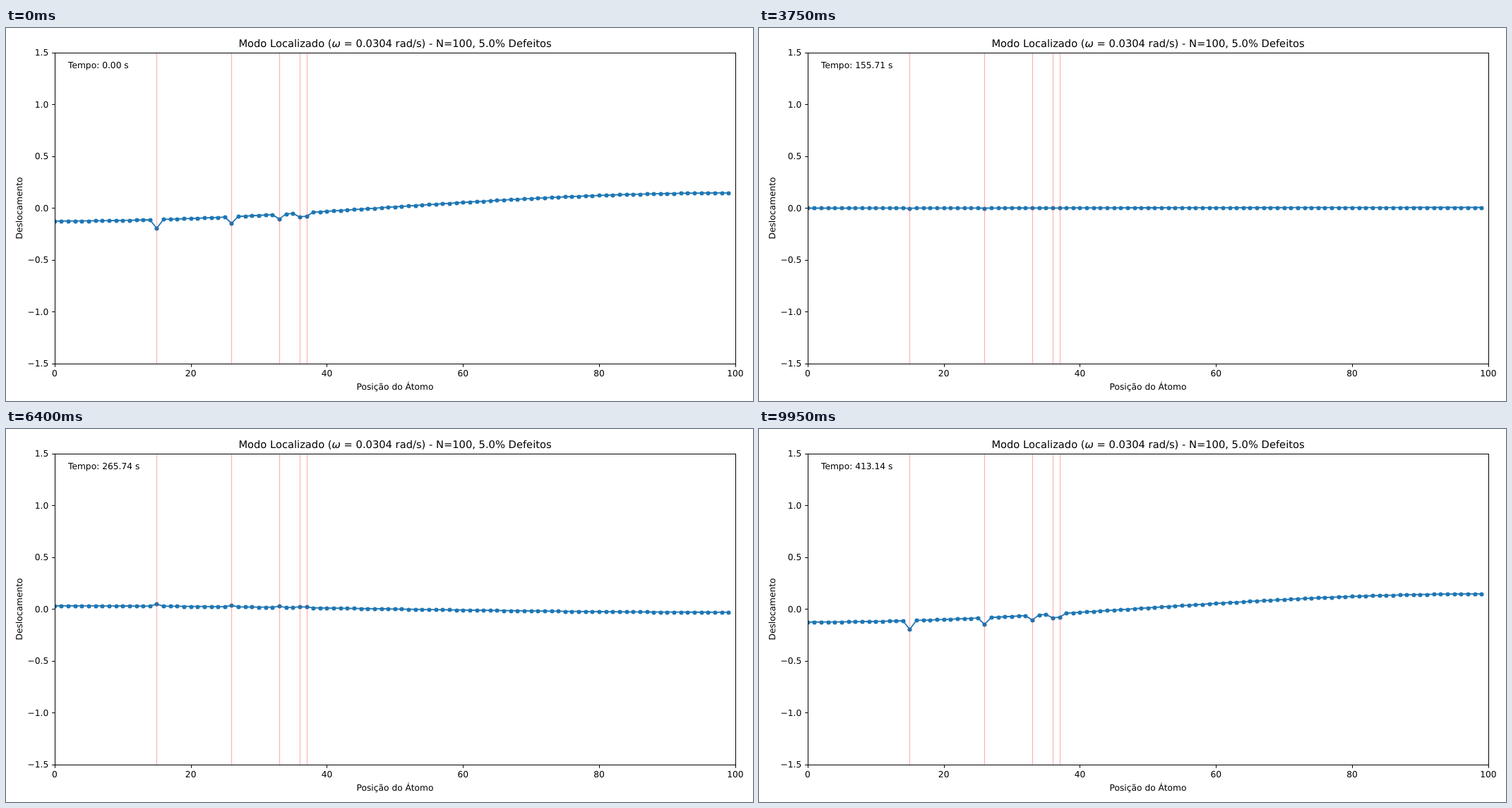
Write an HTML page that moves like this. It is 1058 px wide and 529 px high and loops after 10000 ms.

```html
<!DOCTYPE html>
<html lang="pt">
<head>
<meta charset="utf-8">
<style>
  html, body { margin: 0; width: 100%; height: 100%; overflow: hidden; background: #fff; }
  svg { display: block; }
  text { font: 12.25px "DejaVu Sans", sans-serif; text-rendering: geometricPrecision; white-space: pre; }
  .title { font-size: 14.7px; }
  .middle { text-anchor: middle; }
  .end { text-anchor: end; }
  .axis { fill: none; stroke: #000; }
  .defect { stroke: #f00; stroke-opacity: .3; stroke-width: 1.22; }
  .chain { fill: none; stroke: #1f77b4; stroke-width: 1.84; stroke-linejoin: round; }
  .atom { fill: #1f77b4; }
</style>
</head>
<body>
<svg width="1058" height="529" viewBox="0 0 1058 529">
  <clipPath id="plot"><rect x="69" y="35" width="964" height="441"/></clipPath>
  <g id="scene" clip-path="url(#plot)"></g>
  <g id="axes"></g>
</svg>
<script>
const ATOMS = 100, DEFECTS = [15, 26, 33, 36, 37], DEFECT_MASS = 3;
const FRAMES = 200, FRAME_MS = 50, DURATION = 413.14;
const OMEGA = 4 * Math.PI / DURATION;

const xAt = v => 68.85 + 9.64 * v;
const yAt = v => 255.02 - 147 * v;
const snap = v => Math.floor(v + 0.5) + 0.5;

const scene = document.getElementById('scene');
const axes = document.getElementById('axes');

function add(parent, tag, attrs, content = '') {
  const el = document.createElementNS('http://www.w3.org/2000/svg', tag);
  for (const [key, value] of Object.entries(attrs)) el.setAttribute(key, value);
  el.textContent = content;
  parent.append(el);
  return el;
}

// Free-ended chain of unit springs; amplitudes are mass-weighted and normalised.
function vibrationMode() {
  const mode = [];
  let u = -1, slope = 0;
  for (let i = 0; i < ATOMS; i++) {
    const mass = DEFECTS.includes(i) ? DEFECT_MASS : 1;
    mode.push(u * Math.sqrt(mass));
    slope -= mass * OMEGA ** 2 * u;
    u += slope;
  }
  const norm = Math.hypot(...mode);
  return mode.map(v => v / norm);
}

const mode = vibrationMode();
const chain = add(scene, 'path', { class: 'chain' });
const atoms = mode.map((_, i) => add(scene, 'circle', { class: 'atom', cx: snap(xAt(i)), r: 3.06 }));
for (const d of DEFECTS) add(scene, 'path', { class: 'defect', d: `M${snap(xAt(d))} 35V476` });

add(axes, 'rect', { class: 'axis', x: 69.5, y: 35.5, width: 964, height: 441 });
for (let v = 0; v <= 100; v += 20) {
  const x = xAt(v);
  add(axes, 'path', { class: 'axis', d: `M${snap(x)} 476.5v4.3` });
  add(axes, 'text', { class: 'middle', x, y: 494 }, v);
}
for (let v = -1.5; v <= 1.5; v += 0.5) {
  const y = yAt(v);
  add(axes, 'path', { class: 'axis', d: `M69.5 ${snap(y)}h-4.3` });
  add(axes, 'text', { class: 'end', x: 60.3, y: Math.round(y + 4.7) }, v.toFixed(1).replace('-', '\u2212'));
}
add(axes, 'text', { class: 'middle', x: 551, y: 513 }, 'Posição do Átomo');
add(axes, 'text', { class: 'middle', transform: 'translate(23 255.5) rotate(-90)' }, 'Deslocamento');
const title = add(axes, 'text', { class: 'title middle', x: 551, y: 27 }, 'Modo Localizado (');
add(title, 'tspan', { 'font-style': 'oblique' }, 'ω');
add(title, 'tspan', {}, ' = 0.0304 rad/s) - N=100, 5.0% Defeitos');
const clock = add(axes, 'text', { x: 88, y: 57 });

function draw(now) {
  const frame = Math.floor(now / FRAME_MS) % FRAMES;
  const time = DURATION * frame / (FRAMES - 1);
  const swing = Math.cos(OMEGA * time);
  const ys = mode.map(v => yAt(v * swing));
  chain.setAttribute('d', 'M' + ys.map((y, i) => `${xAt(i)} ${y}`).join('L'));
  atoms.forEach((atom, i) => atom.setAttribute('cy', snap(ys[i])));
  clock.textContent = `Tempo: ${time.toFixed(2)} s`;
}

const start = performance.now();
function tick() {
  draw(performance.now() - start);
  requestAnimationFrame(tick);
}
tick();
</script>
</body>
</html>
```
